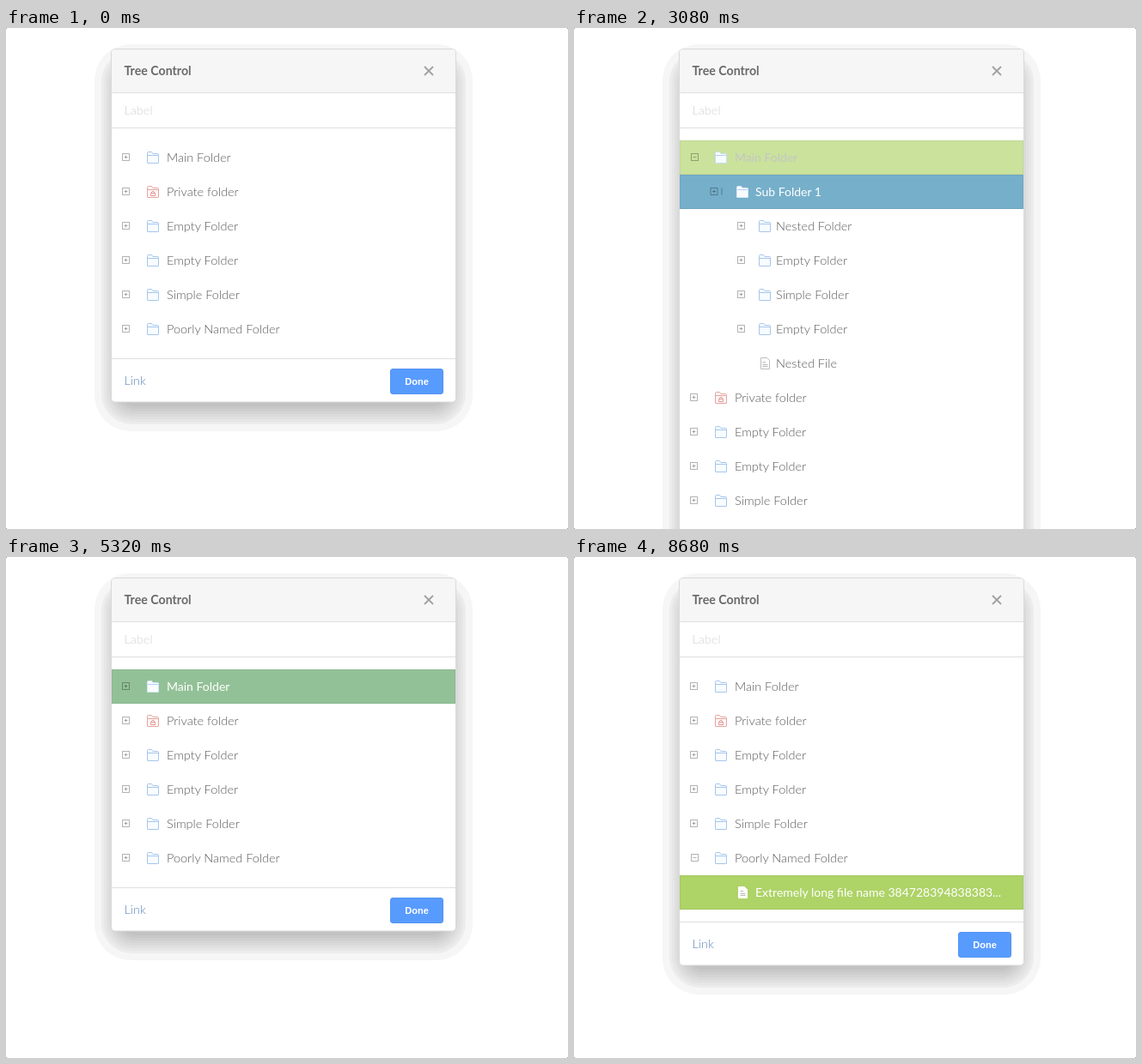
An HTML page that plays this animation: 654x584 px, repeating every 8.82 s.

```html
<!DOCTYPE html>
<html lang="en">
<head>
<meta charset="utf-8">
<title>Tree Control</title>
<style>
html, body { margin: 0; width: 100%; height: 100%; overflow: hidden; background: #fff; }
svg { display: block; width: 654px; height: 584px; font: 300 14.5px Lato, sans-serif; }
</style>
</head>
<body>
<svg id="stage" viewBox="0 0 654 584"></svg>
<script>
const LOOP = 8820, STEP = 70, FADE = 300, ROW = 40, TOP = 131;
const WHITE = [255, 255, 255], BLUE = [88, 155, 255], GREEN = [174, 211, 103], GREY = [90, 90, 90], BLACK = [0, 0, 0];
const OPEN_MAIN = 1810, OPEN_SUB = 3013, CLOSE_MAIN = 5200, OPEN_POOR = 6290, PICK_FILE = 7760;

// fades: [start time, new background]; open: [from, to]
const tree = [
  { name: 'Main Folder', open: [OPEN_MAIN, CLOSE_MAIN],
    fades: [[1230, BLUE], [OPEN_MAIN, GREEN], [OPEN_SUB, WHITE], [4180, BLUE], [CLOSE_MAIN, GREEN], [OPEN_POOR, WHITE]],
    kids: [
      { name: 'Sub Folder 1', open: [OPEN_SUB, CLOSE_MAIN], fades: [[2525, BLUE], [OPEN_SUB, GREEN]],
        kids: [
          { name: 'Nested Folder' }, { name: 'Empty Folder' }, { name: 'Simple Folder' },
          { name: 'Empty Folder' }, { name: 'Nested File', type: 'file' }
        ] }
    ] },
  { name: 'Private folder', type: 'locked' },
  { name: 'Empty Folder' },
  { name: 'Empty Folder' },
  { name: 'Simple Folder' },
  { name: 'Poorly Named Folder', open: [OPEN_POOR, LOOP],
    fades: [[5745, BLUE], [OPEN_POOR, GREEN], [PICK_FILE, WHITE]],
    kids: [{ name: 'Extremely long file name 384728394838383...', type: 'file', fades: [[6974, BLUE], [PICK_FILE, GREEN]] }] }
];

const mix = (a, b, k) => a.map((v, i) => v + (b[i] - v) * k);
const rgb = c => `rgb(${c.map(Math.round)})`;
const rect = (x, y, w, h, fill, r = 0, more = '') =>
  `<rect x="${x}" y="${y}" width="${w}" height="${h}" rx="${r}" fill="${fill}" ${more}/>`;
const bordered = (x, y, w, h, color, r) =>
  rect(x + .5, y + .5, w - 1, h - 1, rgb(color), r, `stroke="${rgb(mix(color, BLACK, .05))}"`);
const path = (d, stroke, fill = 'none', width = 1) =>
  `<path d="${d}" stroke="${stroke}" fill="${fill}" stroke-width="${width}"/>`;
const text = (x, y, s, fill, more = '') => `<text x="${x}" y="${y}" fill="${fill}" ${more}>${s}</text>`;
const at = (x, y, s) => `<g transform="translate(${x} ${y})">${s}</g>`;

// cubic-bezier(.25, .1, .25, 1)
function ease(x) {
  if (x <= 0) return 0;
  if (x >= 1) return 1;
  const bez = (a, b, u) => 3 * a * u * (1 - u) ** 2 + 3 * b * u * u * (1 - u) + u ** 3;
  let lo = 0, hi = 1;
  for (let i = 0; i < 16; i++) {
    const mid = (lo + hi) / 2;
    if (bez(.25, .25, mid) < x) lo = mid; else hi = mid;
  }
  return bez(.1, 1, lo);
}

// Background colour and text highlight (0 to 1) of a row
function look(node, t) {
  let bg = WHITE, lit = 0;
  for (const [start, color] of node.fades || []) {
    const k = ease((t - start) / FADE);
    bg = mix(bg, color, k);
    lit += ((color === WHITE ? 0 : 1) - lit) * k;
  }
  return { bg, lit };
}

const isOpen = (node, t) => node.open && t >= node.open[0] && t < node.open[1];

function toggle(node, t) {
  const ink = 'rgba(0,0,0,.3)', box = 'M-4 -4H4V4H-4ZM-2 0H2', plus = box + 'M0 -2V2';
  if (!isOpen(node, t)) return path(plus, ink);
  if (t - node.open[0] < 100) return at(-4, 0, path(plus, ink)) + path('M5 -4V4', ink);
  return at(1, 0, path(box, ink));
}

function icon(type, lit) {
  if (type === 'file') {
    return path('M2.5 .5H9.5L12.5 3.5V13.5H2.5Z', rgb(mix([190, 190, 190], WHITE, lit)), '#fff') +
      path('M4.5 5.5H8M4.5 8.5H10.5M4.5 10.5H10.5', 'rgba(0,0,0,.28)');
  }
  const locked = type === 'locked';
  const ink = mix(locked ? [230, 164, 160] : [166, 198, 236], [215, 230, 250], lit);
  return path('M.5 13V1.5Q.5 .5 1.5 .5H5.5L7 2.5H12.5Q13.5 2.5 13.5 3.5V13Q13.5 13.5 13 13.5H1Q.5 13.5 .5 13Z', rgb(ink), locked ? '#fff8f7' : '#f8fcff') +
    path('M1 4.5H13', rgb(mix(ink, BLUE, lit * .3))) +
    (locked ? path('M4.5 8.5H9.5V11.5H4.5ZM5.5 8.5V7Q7 5.5 8.5 7V8.5', '#e29a96') : '');
}

function row(node, level, y, t) {
  const { bg, lit } = look(node, t), mid = y + ROW / 2;
  return (lit > 0 ? bordered(123, y, 400, ROW, bg, 0) : '') +
    (node.type === 'file' ? '' : at(139.5 + 27.5 * level, mid - .5, toggle(node, t))) +
    at(Math.floor(164 + 25.5 * level), mid - 7, icon(node.type, lit)) +
    text(187 + 24 * level, mid + 5, node.name, rgb(mix(GREY, WHITE, lit)), lit > .5 ? 'font-weight="400" font-size="14"' : '');
}

function shadow(h) {
  const ring = (d, v) => rect(123 - d, 39 - d, 400 + 2 * d, h + 2 * d, rgb([v, v, v]), 26 + .8 * d);
  let s = ring(20, 246);
  for (let d = 12; d > -12; d -= 3) s += ring(d, 236 - 2 * (12 - d));
  return s;
}

function draw(t) {
  let rows = '', y = TOP;
  const add = (nodes, level) => nodes.forEach(node => {
    rows += row(node, level, y, t);
    y += ROW;
    if (isOpen(node, t)) add(node.kids, level + 1);
  });
  add(tree, 0);
  const foot = y + 14, h = foot + 51 - 25;

  stage.innerHTML =
    [[0, 0], [653, 0], [0, 583], [653, 583]].map(([x, y]) => rect(x, y, 1, 1, '#999')).join('') +
    shadow(h) +
    rect(122.5, 24.5, 401, h + .5, '#fff', 4, 'stroke="#d9d9d9"') +
    path('M123 75V29Q123 25 127 25H519Q523 25 523 29V75Z', 'none', '#f6f6f6') +
    path(`M123 75.5H523M123 116.5H523M123 ${foot + .5}H523`, '#dfdfdf') +
    text(137.5, 55, 'Tree Control', '#6a6a6a', 'font-weight="700" font-size="14.2"') +
    path('M487 45L497 55M497 45L487 55', '#a0a0a0', 'none', 1.8) +
    text(137.5, 101, 'Label', '#d4d4d4') +
    rows +
    text(137.5, foot + 31, 'Link', '#5f88bc') +
    bordered(447, foot + 12, 62, 30, BLUE, 2.5) +
    text(478, foot + 31, 'Done', '#fff', 'text-anchor="middle" style="font:bold 11px \'Liberation Sans\',Arial,sans-serif"');
}

const stage = document.getElementById('stage');
let start, last;
function tick(now) {
  start ??= now;
  const t = Math.floor(((now - start) % LOOP) / STEP) * STEP;
  if (t !== last) draw(last = t);
  requestAnimationFrame(tick);
}
draw(0);
requestAnimationFrame(tick);
</script>
</body>
</html>
```
